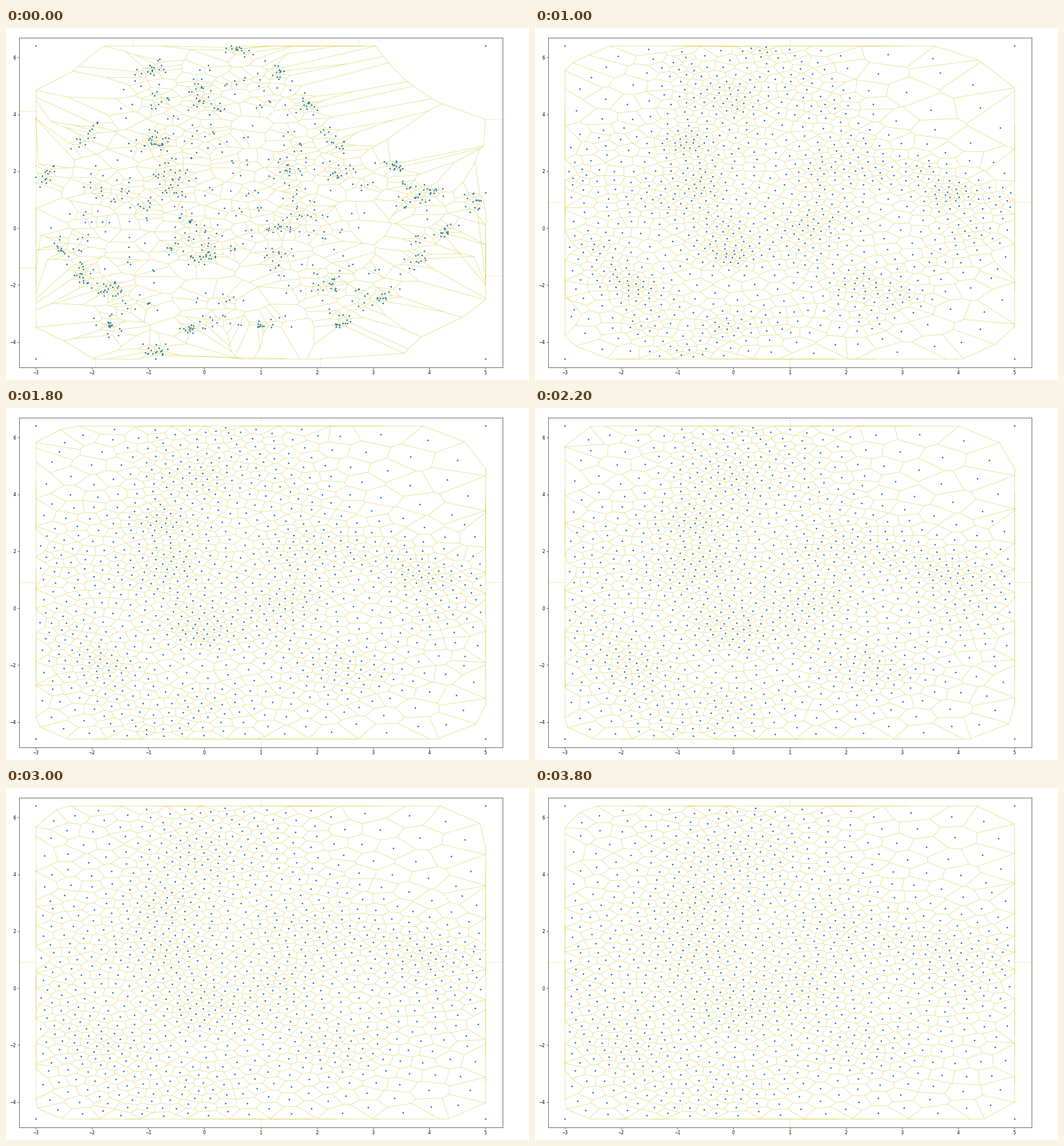
Recreate the animation shown at these times as a matplotlib script. Size 913 px wide and 614 px high, loop 4000 ms.

```python
import numpy as np
import matplotlib.pyplot as plt
from matplotlib.animation import FuncAnimation
from matplotlib.collections import LineCollection
from matplotlib.path import Path
from matplotlib.tri import Triangulation

W, H, DPI = 913, 614, 72
STEPS, INTERVAL = 20, 200
SCALE = .755  # size of type, ticks, strokes and dots against the defaults
LO, HI = np.array([-3.0, -4.58]), np.array([5.0, 6.4])
CORNERS = np.array([LO, (HI[0], LO[1]), HI, (LO[0], HI[1])])

# Key points: the outline of the cloud and the dense spots within it
RIM = np.array([
    (.6, 6.3), (1.4, 5.4), (1.85, 4.4), (2.3, 3), (3.4, 2.2), (3.95, 1.3),
    (4.9, 1), (4.3, -.1), (3.8, -1.1), (3.2, -2.4), (2.4, -3.4), (1.05, -3.4),
    (-.25, -3.5), (-.9, -4.4), (-1.7, -3.5), (-2.2, -1.7), (-2.6, -.7),
    (-2.85, 1.85), (-2.2, 3), (-1, 5.6),
])
CORES = np.array([
    (0, 4.6), (-1, 2.9), (-.7, 1.5), (1.4, 2), (2.5, 1.9), (3.8, .9),
    (-.2, .2), (1.4, .1), (0, -1), (1.3, -1.2), (2.2, -2), (-1.6, -2.05),
])

# Points held on the border for a while: x, y, slide per step, last step.
# They sit a hair outside the box to keep the hull strictly convex.
EPS = 1e-3
PINS = [
    (.48, HI[1] + EPS, -.647, 0, 3),
    (-.87, LO[1] - EPS, -.403, 0, 3),
    (LO[0] - EPS, 1.8, 0, .1, 1),
    (HI[0] + EPS, 1.25, 0, 0, 0),
]


def keep_inside(pts, inset=.02):
    return np.clip(pts, LO + inset, HI - inset)


def scatter(rng):
    """Clumps strung along the rim, round the cores and across the inside."""
    def clumps(centres, size, sd):
        pts = np.repeat(centres, size, axis=0)
        return pts + rng.normal(size=pts.shape) * sd

    n = len(RIM)
    t = np.repeat(np.arange(n), 14)
    t = (t + rng.normal(size=t.size) * .15) % n
    loop = np.vstack([RIM, RIM[:1]])
    along = np.column_stack([np.interp(t, range(n + 1), loop[:, i])
                             for i in (0, 1)])
    spots = rng.uniform(LO, HI, (1000, 2))
    spots = spots[Path(RIM).contains_points(spots)][:130]

    pts = np.vstack([clumps(along, 1, (.07, .1)),
                     clumps(CORES, 16, (.18, .25)),
                     clumps(spots, 3, (.12, .16))])
    pts = HI - np.abs(HI - pts)
    pts = LO + np.abs(pts - LO)
    return keep_inside(pts)


def hold(pts, step):
    """Put the corners and the pinned points back in place."""
    k = len(CORNERS) + len(PINS)
    pts[-k:-len(PINS)] = CORNERS
    for i, (x, y, dx, dy, last) in enumerate(PINS):
        if step <= last:
            pts[i - len(PINS)] = x + dx * step, y + dy * step
    return pts


def cross(u, v):
    return u[:, 0] * v[:, 1] - u[:, 1] * v[:, 0]


def circumcentres(a, b, c):
    u, v = b - a, c - a
    d = 2 * cross(u, v)
    d = np.where(np.abs(d) < 1e-12, 1e-12, d)
    uu, vv = (u * u).sum(1), (v * v).sum(1)
    off = np.column_stack([v[:, 1] * uu - u[:, 1] * vv,
                           u[:, 0] * vv - v[:, 0] * uu])
    return a + off / d[:, None]


def voronoi(pts):
    """Return finite edges, outward rays and cell centroids."""
    mesh = Triangulation(pts[:, 0], pts[:, 1])
    tri, nbr = mesh.triangles, mesh.neighbors
    verts = np.clip(circumcentres(*(pts[tri[:, j]] for j in range(3))), LO, HI)

    # Directed Delaunay edges p -> q of triangle t, with m on the other side
    t = np.repeat(np.arange(len(tri)), 3)
    p, q = tri.ravel(), np.roll(tri, -1, axis=1).ravel()
    m = nbr.ravel()
    hull = m < 0

    once = m > t
    edges = np.stack([verts[t[once]], verts[m[once]]], axis=1)

    side = pts[q[hull]] - pts[p[hull]]
    out = np.column_stack([side[:, 1], -side[:, 0]])
    out /= np.hypot(out[:, 0], out[:, 1])[:, None]
    start = verts[t[hull]]
    rays = np.stack([start, start + 11 * out], axis=1)

    # Open cells are closed from their last finite vertex to the first
    first = np.zeros(len(pts), int)
    first[p[hull]] = t[hull]
    m = np.where(hull, first[q], m)
    u, v = verts[t] - pts[q], verts[m] - pts[q]
    a = cross(u, v)

    def total(w):
        return np.bincount(q, w, minlength=len(pts))

    area = total(a)
    moment = np.column_stack([total((u + v)[:, i] * a) for i in (0, 1)])
    ok = np.abs(area) > 1e-5
    shift = np.where(ok[:, None],
                     moment / (3 * np.where(ok, area, 1))[:, None], 0)
    return edges, rays, pts + shift


def relax():
    rng = np.random.default_rng(11)
    pts = np.vstack([scatter(rng), CORNERS, [pin[:2] for pin in PINS]])
    states = []
    for step in range(STEPS):
        pts = hold(pts, step)
        edges, rays, centroids = voronoi(pts)
        states.append((pts, edges, rays))
        pts = keep_inside(centroids)
    return states


states = relax()

plt.rcParams.update({
    "font.size": 10 * SCALE,
    "axes.linewidth": .8 * SCALE,
    "lines.markeredgewidth": SCALE,
    **{f"{axis}tick.major.{key}": size * SCALE
       for axis in "xy"
       for key, size in (("size", 3.5), ("pad", 3.5), ("width", .8))},
})

fig = plt.figure(figsize=(W / DPI, H / DPI), dpi=DPI, facecolor="white")
ax = fig.add_axes([22.5 / W, 22.5 / H, 844 / W, 575 / H])
ax.set_xlim(LO[0] - .3, HI[0] + .3)
ax.set_ylim(LO[1] - .3, HI[1] + .3)
ax.set_xticks(range(-3, 6))
ax.set_yticks(range(-4, 7, 2))

line = dict(colors="y", lw=SCALE, alpha=.5)
edge_lines = ax.add_collection(LineCollection([], **line), autolim=False)
ray_lines = ax.add_collection(
    LineCollection([], linestyles="dashed", **line), autolim=False)
dots, = ax.plot([], [], ".", ms=5 * SCALE, color="C0")


def draw(step):
    pts, edges, rays = states[step]
    dots.set_data(pts[:, 0], pts[:, 1])
    edge_lines.set_segments(edges)
    ray_lines.set_segments(rays)
    return edge_lines, ray_lines, dots


anim = FuncAnimation(fig, draw, frames=STEPS, interval=INTERVAL,
                     repeat=True, repeat_delay=0)
plt.show()
```
